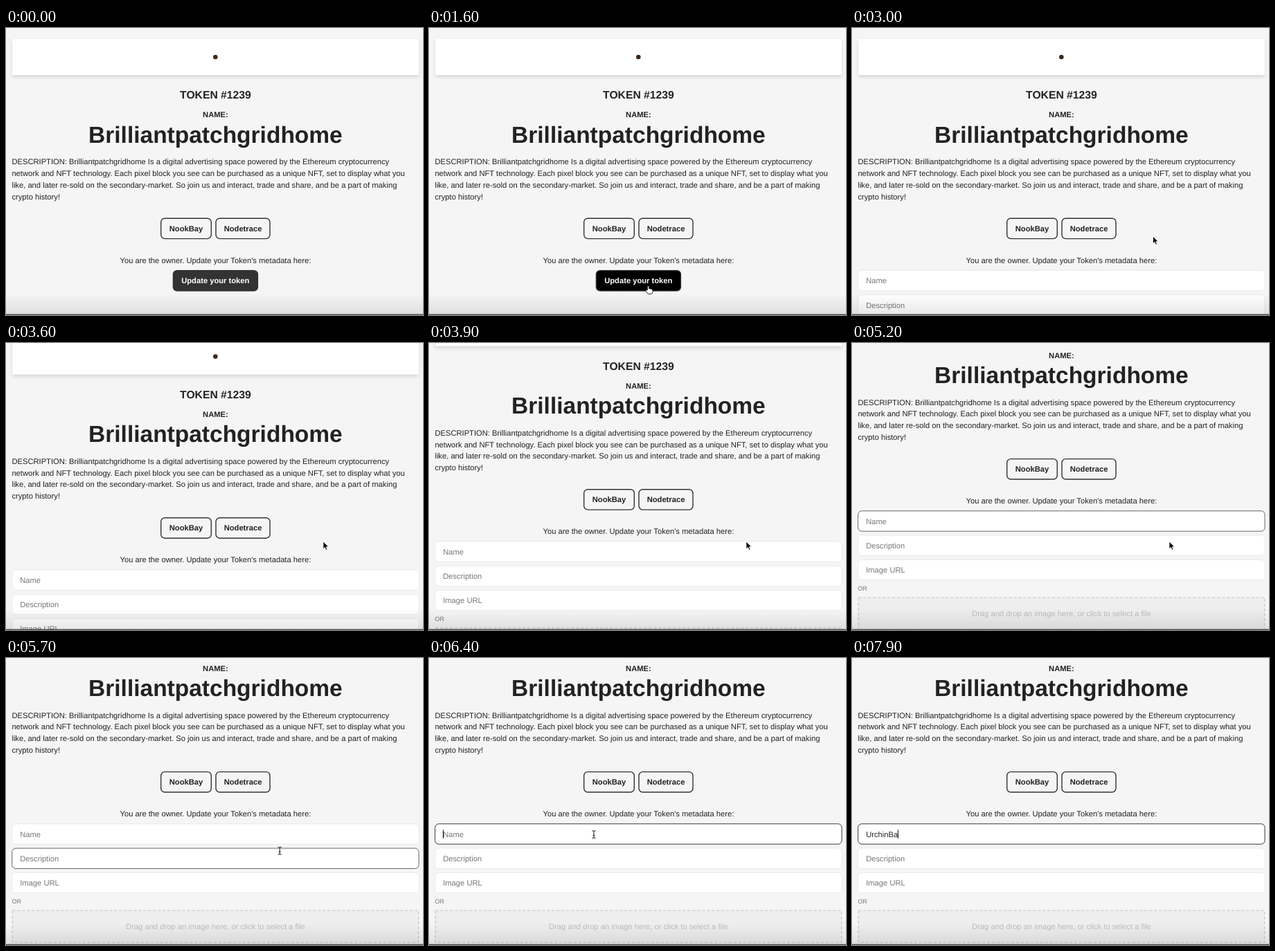
Recreate the animation shown at these times as an HTML page. Size 602 px wide and 415 px high, loop 8 s.

```html
<!DOCTYPE html>
<html lang="en">
<head>
<meta charset="utf-8">
<title>Token page</title>
<style>
  html, body { margin: 0; width: 100%; height: 100%; overflow: hidden; background: #f5f5f5; }
  svg { display: block; width: 602px; height: 415px; }
  text { font: 11.2px "Liberation Sans", Arial, sans-serif; fill: #222; text-rendering: geometricPrecision; white-space: pre; }
  .mid { text-anchor: middle; }
  .bold { font-weight: bold; }
  .h1 { font-size: 33.5px; }
  .h2 { font-size: 15.7px; }
  .hint { fill: #777; }
  .link { fill: none; stroke: #333; stroke-width: 1.4; }
  .field { fill: #fff; stroke: #e8e8e8; stroke-width: .9; }
  .card { fill: #fff; filter: drop-shadow(0 3px 2.5px rgba(0,0,0,.12)); }
</style>
</head>
<body>
<svg viewBox="0 0 602 415">
  <defs>
    <linearGradient id="fade" x2="0" y2="1">
      <stop stop-color="#000" stop-opacity="0"/>
      <stop offset="1" stop-color="#000" stop-opacity=".09"/>
    </linearGradient>
  </defs>

  <g id="page">
    <rect class="card" x="9.2" y="16" width="586.6" height="52"/>
    <circle cx="302.3" cy="42" r="3.3" fill="#3b2a1e"/>
    <text class="mid bold h2" x="302.4" y="102">TOKEN #1239</text>
    <text class="mid bold" x="302.4" y="129.2">NAME:</text>
    <text class="mid bold h1" x="302.4" y="165.8">Brilliantpatchgridhome</text>
    <text x="8.4" y="197.2">DESCRIPTION: Brilliantpatchgridhome Is a digital advertising space powered by the Ethereum cryptocurrency</text>
    <text x="8.4" y="214">network and NFT technology. Each pixel block you see can be purchased as a unique NFT, set to display what you</text>
    <text x="8.4" y="230.8">like, and later re-sold on the secondary-market. So join us and interact, trade and share, and be a part of making</text>
    <text x="8.4" y="247.6">crypto history!</text>

    <rect class="link" x="223.7" y="275.2" width="72.6" height="29.4" rx="5.5"/>
    <text class="mid bold" x="260" y="293.6">NookBay</text>
    <rect class="link" x="303" y="275.2" width="78" height="29.4" rx="5.5"/>
    <text class="mid bold" x="342" y="293.6">Nodetrace</text>
    <text class="mid" x="302.4" y="339.8">You are the owner. Update your Token's metadata here:</text>

    <g id="update">
      <rect id="button" x="241.4" y="350.7" width="122" height="29.4" rx="5.5" stroke-width="1.4"/>
      <text class="mid bold" x="302.3" y="369.2" style="fill:#fff">Update your token</text>
    </g>

    <g id="form">
      <rect class="field" id="name" x="8.7" y="350.4" width="587.3" height="29.4" rx="5.5"/>
      <text id="value" x="20.2" y="369.2"></text>
      <path id="caret" d="M0 359V371.5" stroke="#111"/>
      <rect class="field" id="desc" x="8.7" y="385.7" width="587.3" height="29.4" rx="5.5"/>
      <text class="hint" x="20.2" y="404.6">Description</text>
      <rect class="field" x="8.7" y="421" width="587.3" height="29.4" rx="5.5"/>
      <text class="hint" x="20.2" y="439.7">Image URL</text>
      <text class="hint" x="8.4" y="465.6" style="font-size:9px">OR</text>
      <rect x="9.2" y="475.7" width="586.4" height="46" fill="#eee" stroke="#ccc" stroke-width="1.4" stroke-dasharray="4.2 2.8"/>
      <text class="mid" x="302.4" y="502.4" style="fill:#bdbdbd">Drag and drop an image here, or click to select a file</text>
    </g>
  </g>

  <rect y="384" width="602" height="30" fill="url(#fade)"/>
  <rect y="413.7" width="602" height="1.3" fill="#484848"/>

  <g id="cursor">
    <path id="arrow" d="M0 -.8V9.6L2.4 7.4L4.1 11.2L5.8 10.4L4.2 6.7H7.5Z" fill="#000" stroke="#fff" stroke-width=".7"/>
    <path id="hand" d="M-1.6 6V.6Q-.6 -.8 .5 .6V4Q1.7 3.2 2.5 4.4Q3.6 3.7 4.4 4.9Q5.8 4.6 6 6V8.4L4.8 11.4H-1.2L-4 7.2Q-4.2 5.2 -2.8 5.6Z" fill="#fff" stroke="#000" stroke-width=".8"/>
    <path id="beam" d="M-2.5 -5.3Q0 -5.3 0 -4Q0 -5.3 2.5 -5.3M0 -4V4.3M-2.5 5.6Q0 5.6 0 4.3Q0 5.6 2.5 5.6M-1.3 1.6H1.3" fill="none" stroke="#111"/>
  </g>
</svg>
<script>
const LOOP = 8000, TICK = 100;
const $ = id => document.getElementById(id);

// Keys: [time, scroll] and [time, x, y]
const scrollKeys = [[3300, 0], [3400, 4], [3600, 22.4], [3800, 50], [4000, 77], [4200, 91.4],
  [4400, 91.4], [4500, 96.4], [4700, 99.6], [4900, 99.6], [5200, 107.6], [5400, 110.6]];
const mouseKeys = [[300, 346, 2], [400, 372, 60], [500, 412, 140], [600, 439, 225], [700, 425, 305],
  [800, 402, 347], [1200, 402, 347], [1600, 317, 373], [2500, 317, 373], [3100, 458, 288],
  [5500, 458, 288], [6200, 238, 255]];
const word = "UrchinBa";
const keyTimes = [6600, 6800, 6900, 7000, 7200, 7300, 7600, 7900];

function at(keys, t) {
  const i = keys.findIndex(k => k[0] > t);
  if (i < 0) return keys.at(-1).slice(1);
  if (i === 0) return keys[0].slice(1);
  const a = keys[i - 1], b = keys[i], p = (t - a[0]) / (b[0] - a[0]);
  return a.slice(1).map((v, j) => v + (b[j + 1] - v) * p);
}

const show = (id, on) => $(id).style.display = on ? "" : "none";
const within = (t, from, to) => t >= from && t < to;

function draw(t) {
  const [scroll] = at(scrollKeys, t), [x, y] = at(mouseKeys, t);
  $("page").setAttribute("transform", `translate(0 ${-scroll})`);

  const open = t >= 2500, hover = within(t, 1500, 2500);
  show("update", !open);
  show("form", open);
  $("button").style.fill = t >= 1600 ? "#000" : hover ? "#191919" : "#333";
  $("button").style.stroke = t >= 2200 ? "#000" : "#333";

  const overName = within(t, 2500, 2700) || within(t, 4300, 5600) || t >= 5900;
  const overDesc = within(t, 5600, 5900);
  $("name").style.stroke = t >= 6400 ? "#222" : overName ? "#555" : "";
  $("desc").style.stroke = overDesc ? "#555" : "";

  const typed = word.slice(0, keyTimes.filter(k => k <= t).length);
  const value = $("value");
  value.textContent = typed || "Name";
  value.setAttribute("class", typed ? "" : "hint");
  show("caret", t >= 6400);
  const caretX = 20.5 + (typed ? value.getComputedTextLength() : 0);
  $("caret").setAttribute("transform", `translate(${caretX} 0)`);

  const beam = within(t, 2500, 2700) || t >= 5600;
  show("cursor", within(t, 300, 6600));
  $("cursor").setAttribute("transform", `translate(${x} ${y})`);
  show("hand", hover);
  show("beam", beam);
  show("arrow", !hover && !beam);
}

const start = performance.now();
function loop() {
  const t = (performance.now() - start) % LOOP;
  draw(Math.floor(t / TICK) * TICK);
  requestAnimationFrame(loop);
}
loop();
</script>
</body>
</html>
```
